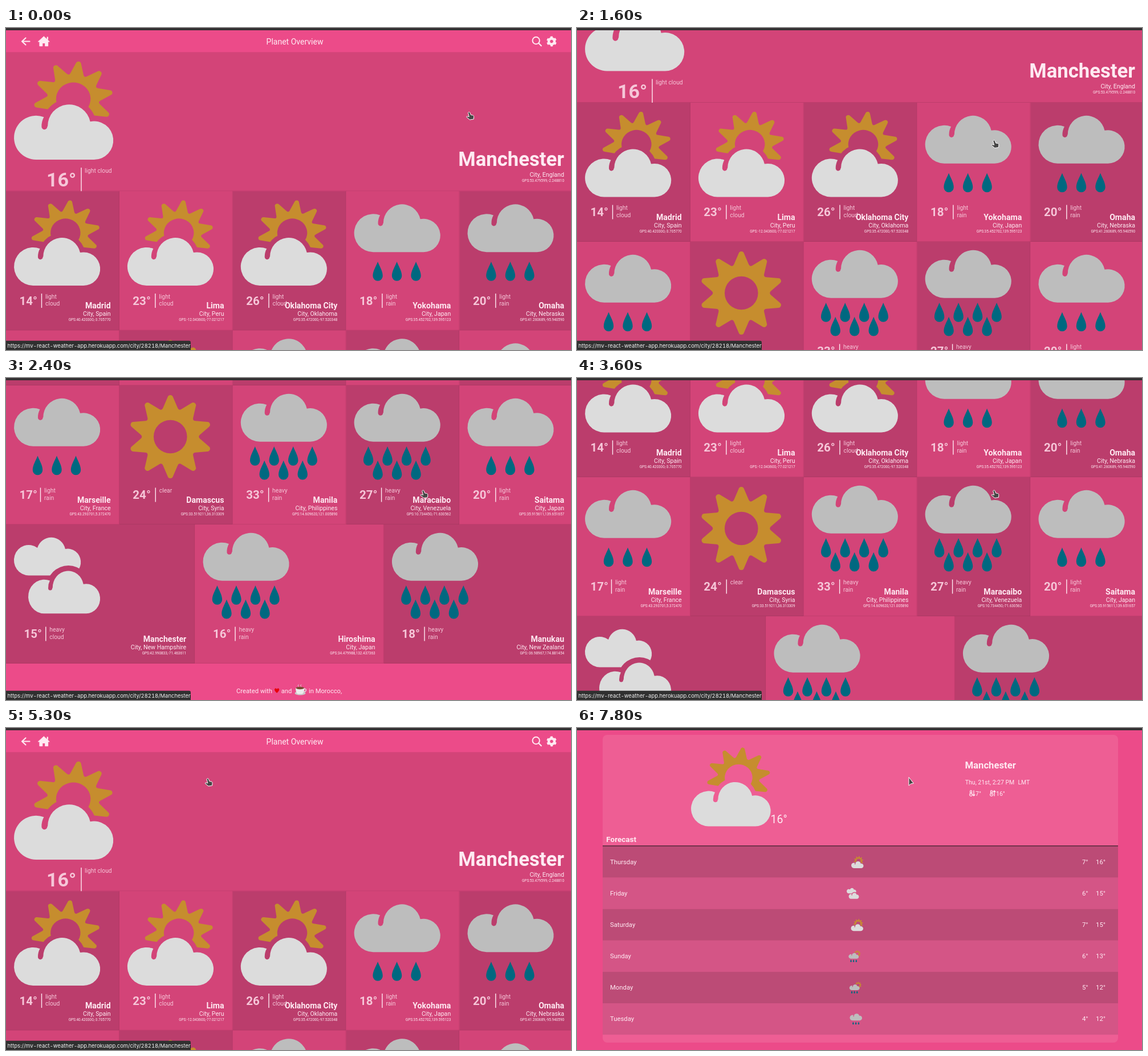
Animation of 991x565 px, one loop 8 s. Source, as an HTML page:

```html
<!DOCTYPE html>
<html lang="en">
<head>
<meta charset="utf-8">
<title>Weather tiles</title>
<style>
html, body { margin: 0; width: 100%; height: 100%; overflow: hidden; background: #ec4b89; }
svg { display: block; width: 991px; height: 565px; }
text { font-family: Roboto, "Open Sans", sans-serif; fill: #ffeaf2; white-space: pre; }
.b { font-weight: 700; }
.soft { fill: #f6c6d8; }
.tip { font-family: Inter, Roboto, sans-serif; font-variant-numeric: tabular-nums; fill: #f2f2f2; }
</style>
</head>
<body>
<svg id="stage" viewBox="0 0 991 565"></svg>
<script>
const LOOP = 8000, PAGE_W = 994.3, ROW_H = 244;
const PINK = '#ec4b89', LIGHT = '#d34478', DARK = '#bb3d6c';
const WHITE = '#ffeaf2', PALE = '#dcdcdc', GREY = '#bdbdbd', SUN = '#c68d2e', RAIN = '#006880';

const text = (x, y, size, str, cls = '', anchor = 'start') =>
  `<text x="${x}" y="${y}" font-size="${size}" class="${cls}" text-anchor="${anchor}">${str}</text>`;
const rect = (x, y, w, h, fill, extra = '') =>
  `<rect x="${x}" y="${y}" width="${w}" height="${h}" fill="${fill}" ${extra}/>`;
const path = (d, fill, extra = '') => `<path d="${d}" fill="${fill}" ${extra}/>`;
const line = (d, width, color = WHITE) =>
  path(d, 'none', `stroke="${color}" stroke-width="${width}" stroke-linecap="round" stroke-linejoin="round"`);
const group = (transform, body) => `<g transform="${transform}">${body}</g>`;

// Weather icons are drawn in a 151-unit square.
const ring = (x, y, r) => `M${x - r} ${y}a${r} ${r} 0 1 0 ${2 * r} 0a${r} ${r} 0 1 0 ${-2 * r} 0Z`;
const outside = (id, x, y, r) =>
  `<clipPath id="${id}"><path clip-rule="evenodd" d="M-40-40H200V200H-40Z${ring(x, y, r)}"/></clipPath>`;

// Ten rounded rays around a hole; valley is the radius where ray sides would meet.
function sun(hole, valley) {
  const tip = [4.7, 69.5], meet = [valley * Math.sin(Math.PI / 10), valley * Math.cos(Math.PI / 10)];
  const bend = tip.map((v, i) => v + (meet[i] - v) * .8);
  let d = '';
  for (let k = 0; k < 10; k++) {
    const spot = ([x, y], side = 1, turn = k) => {
      const a = turn * Math.PI / 5, c = Math.cos(a), s = Math.sin(a);
      return `${(side * x * c + y * s).toFixed(2)} ${(side * x * s - y * c).toFixed(2)}`;
    };
    d += `${k ? 'L' : 'M'}${spot(tip, -1)}A4.9 4.9 0 0 1 ${spot(tip)}` +
      `L${spot(bend)}Q${spot(meet)} ${spot(bend, -1, k + 1)}`;
  }
  return path(d + 'Z' + ring(0, 0, hole), SUN, 'fill-rule="evenodd"');
}

const cloud = fill => path('M33.5 151A33.5 33.5 0 1 1 45.5 86.2Q41.8 93 42 100.7A4.3 4.3 0 0 0 50.6 101' +
  'L51.3 100A32.7 32.7 0 0 1 116 93A29.3 29.3 0 1 1 121.7 151Z', fill);
const plainCloud = path('M33.5 151A33.5 33.5 0 1 1 53 90.3A32.7 32.7 0 0 1 116 93A29.3 29.3 0 1 1 121.7 151Z', PALE);
const drops = (xs, y) => xs.map(x =>
  path(`M${x} ${y}c2.8 8 8.7 16 8.7 25a8.7 8.7 0 0 1-17.4 0c0-9 5.9-17 8.7-25Z`, RAIN)).join('');

const icons = {
  light: `<g clip-path="url(#cutLight)">${group('translate(90.3 58.4) scale(.826 .787) rotate(8)', sun(31.8, 45.5))}</g>` +
    cloud(PALE),
  rain: group('translate(0 -58.7)', cloud(GREY)) + drops([41.5, 75, 108.5], 109),
  pour: group('translate(0 -66.8)', cloud(GREY)) + drops([25, 58.5, 92, 125.5], 92.5) + drops([41.5, 75, 108.5], 117.3),
  clear: group('translate(75.4 75.5)', sun(29.3, 48)),
  heavy: `<g clip-path="url(#cutHeavy)">${group('translate(0 -45.8) scale(.775 .8)', plainCloud)}</g>` +
    group('translate(25 7.4) scale(.834 .89)', cloud(PALE)),
  shower: `<g clip-path="url(#cutShower)">${group('translate(108 43) scale(.58) rotate(8)', sun(31, 45.5))}</g>` +
    group('translate(0 -20) scale(.83)', cloud(GREY)) + drops([30, 62, 95], 113)
};
const defs = `<defs>${outside('cutLight', 84, 100, 41.5)}${outside('cutHeavy', 95.5, 95.5, 38)}` +
  outside('cutShower', 70, 63, 34) +
  Object.entries(icons).map(([id, body]) => `<g id="${id}">${body}</g>`).join('') + '</defs>';
const icon = (id, x, y, size) => `<use href="#${id}" transform="translate(${x} ${y}) scale(${size / 151})"/>`;

// icon, temperature, divider x, condition, name, region, position
const rows = [
  [
    ['light', 14, 62.5, 'light cloud', 'Madrid', 'Spain', '40.420300,-3.705770'],
    ['light', 23, 63, 'light cloud', 'Lima', 'Peru', '-12.043600,-77.021217'],
    ['light', 26, 63.3, 'light cloud', 'Oklahoma City', 'Oklahoma', '35.472000,-97.520348'],
    ['rain', 18, 63.3, 'light rain', 'Yokohama', 'Japan', '35.452702,139.595123'],
    ['rain', 20, 63.4, 'light rain', 'Omaha', 'Nebraska', '41.260689,-95.940590']
  ], [
    ['rain', 17, 60.5, 'light rain', 'Marseille', 'France', '43.293701,5.372470'],
    ['clear', 24, 63.4, 'clear', 'Damascus', 'Syria', '33.519211,36.313309'],
    ['pour', 33, 62.9, 'heavy rain', 'Manila', 'Philippines', '14.609620,121.005890'],
    ['pour', 27, 62, 'heavy rain', 'Maracaibo', 'Venezuela', '10.734450,-71.630562'],
    ['rain', 20, 63.4, 'light rain', 'Saitama', 'Japan', '35.915611,139.651657']
  ], [
    ['heavy', 15, 69.8, 'heavy cloud', 'Manchester', 'New Hampshire', '42.990833,-71.463611'],
    ['pour', 16, 70.6, 'heavy rain', 'Hiroshima', 'Japan', '34.479988,132.437363'],
    ['pour', 18, 71.2, 'heavy rain', 'Manukau', 'New Zealand', '-36.98967,174.881454']
  ]
];

const cell = (x, y, w, fill) => rect(x, y, w, ROW_H + .5, fill) +
  path(`M${x} ${y + ROW_H - .3}H${x + w - .4}V${y}`, 'none', 'stroke="#000" stroke-opacity=".1"');

function tile([kind, temp, divider, sky, name, region, gps], row, col) {
  const w = PAGE_W / rows[row].length, x = col * w, y = 286.5 + row * ROW_H, right = w - 15.2;
  const words = sky.split(' ').map((word, i) => text(divider + 6.5, 188.3 + i * 12.2, 10.3, word, 'soft')).join('');
  return cell(x, y, w, (row + col) % 2 ? LIGHT : DARK) + group(`translate(${x} ${y})`,
    icon(kind, 14, 14.5, 151) +
    text(row === 2 ? 31.5 : 23.5, 199.3, 20.5, temp + '°', 'b soft') +
    rect(divider - .7, 179.5, 1.4, 25, WHITE) + words +
    text(right, 205.5, 14.1, name, 'b', 'end') +
    text(right, 218.7, 10.6, 'City, ' + region, '', 'end') +
    text(right, 227.5, 6.4, 'GPS:' + gps, '', 'end'));
}

const header = rect(0, 0, 991, 42, PINK) +
  line('M41.5 23.5H28.5M34.5 17.5L28 23.5L34.5 29.5', 2.2) +
  path('M56.3 24L66.3 14.8L76.3 24H73.7V31.7H68.7V26.5H63.9V31.7H58.9V24Z', WHITE,
    `stroke="${WHITE}" stroke-width=".9" stroke-linejoin="round"`) +
  path('M71.6 15.5h2.4v5h-2.4Z', WHITE) +
  text(506.5, 28.5, 14, 'Planet Overview', '', 'middle') +
  path(ring(929.7, 22, 6.2), 'none', `stroke="${WHITE}" stroke-width="2"`) + line('M934.4 26.8L938.8 31.2', 2.2) +
  path(ring(957, 23.5, 5), 'none', `stroke="${WHITE}" stroke-width="4.4"`) +
  path(ring(957, 23.5, 7.4), 'none',
    `stroke="${WHITE}" stroke-width="3" stroke-dasharray="4 3.75" stroke-dashoffset="-1.87"`);

const hero = cell(0, 42.3, PAGE_W, LIGHT) + icon('light', 14, 57, 174) +
  text(71, 278, 34, '16°', 'b soft') + rect(131.3, 245, 1.4, 41.5, WHITE) +
  text(138, 254.3, 10.3, 'light cloud', 'soft') +
  text(979, 242.3, 34.7, 'Manchester', 'b', 'end') +
  text(979, 261, 10.7, 'City, England', '', 'end') +
  text(979, 270, 6.4, 'GPS:53.479599,-2.248810', '', 'end');

const cup = '<ellipse cx="516" cy="1070.5" rx="9.5" ry="3.6" fill="#c9c9c9"/>' +
  path('M508 1061.5h15.5c0 6-2.5 10.5-5 10.5h-5.5c-3 0-5-4.5-5-10.5Z', '#ececec') +
  path('M523 1063c5-1 4.5 5.5-1.5 5', 'none', 'stroke="#dedede" stroke-width="1.4"') +
  '<ellipse cx="515.7" cy="1061.5" rx="7.2" ry="2.2" fill="#7a4a32"/>' +
  line('M513 1059q-2-2 0-3.5M517.5 1059q-2-2 0-3.5', 1, '#d8d8d8');
const heart = path('M475.1 1070.3C471 1066.5 470.6 1064.7 471.2 1063.3C472 1061.5 474.3 1061.7 475.1 1063.6' +
  'C475.9 1061.7 478.2 1061.5 479 1063.3C479.6 1064.7 479.2 1066.5 475.1 1070.3Z', '#e8000c');
const footer = rect(0, 1018.5, 991, 70, PINK) + text(404, 1070.3, 11.25, 'Created with') + heart +
  text(482.7, 1070.3, 11.25, 'and') + cup + text(531, 1070.3, 11.2, 'in Morocco,');

// day, icon, icon x, low, high
const days = [
  ['Thursday', 'light', 481, 7, 16], ['Friday', 'heavy', 473, 6, 15], ['Saturday', 'light', 480.5, 7, 15],
  ['Sunday', 'shower', 476.3, 6, 13], ['Monday', 'shower', 477.8, 5, 12], ['Tuesday', 'rain', 478.5, 4, 12]
];
const dayRow = ([day, kind, x, low, high], i) => {
  const y = 207.5 + i * 55.1;
  return rect(45, y, 904, 55.2, i % 2 ? '#d45586' : '#bc4b76') + icon(kind, x, y + 17, 21.5) +
    text(58, y + 31.3, 11.3, day) + text(896.5, y + 31.3, 11.3, low + '°', '', 'end') +
    text(927, y + 31.3, 11.3, high + '°', '', 'end');
};
// Thermometer with an arrow pointing down (1) or up (-1).
const gauge = (x, dir) => path(`M${x + 1.5} 115v-4a1.5 1.5 0 0 1 3 0v4a2.5 2.5 0 1 1-3 0Z`, 'none',
  `stroke="${WHITE}" stroke-width="1.1"`) + line(`M${x + 3} 112v5`, 1.1) +
  line(`M${x + 8} ${114.5 - 4.5 * dir}v${9 * dir}m-1.8 ${-2 * dir}l1.8 ${2 * dir}l1.8 ${-2 * dir}`, 1.3);
const detail = rect(45, 12, 904, 540, '#ee5e94', 'rx="8"') + icon('light', 200, 33, 139.5) +
  text(339.5, 166.8, 19.5, '16°') + text(680.5, 70.5, 16.7, 'Manchester', 'b') +
  text(680.8, 99, 10.5, 'Thu, 21st, 2:27 PM') + text(773.5, 99, 10.3, 'LMT') +
  gauge(688, 1) + text(699, 118.7, 10.5, '7°') + gauge(724, -1) + text(735, 118.7, 10.5, '16°') +
  text(51.3, 199.7, 13.5, 'Forecast', 'b') + days.map(dayRow).join('') + rect(45, 206.3, 904, 1.2, '#2b1a22');

const outline = 'stroke="#fff" stroke-width="1" stroke-linejoin="round"';
const hand = path('M4.5 1.2C5.6.6 6.5 1.2 6.9 2.2L8.4 6L11.5 6.5C13 6.8 13.6 7.8 13.5 9.2L13.2 13.5' +
  'L6.5 14.5L1.2 10.2C.3 9.3 1.2 8 2.5 8.5L5.3 9.3L3.6 3C3.4 2.2 3.8 1.5 4.5 1.2Z', '#464646', outline);
const arrow = path('M0 0V14.8L3.4 11.7L8.3 10.8Z', '#464646', outline);

const stage = document.getElementById('stage');
const tiles = rows.map((cells, row) => cells.map((data, col) => tile(data, row, col)).join('')).join('');
stage.innerHTML = defs + rect(0, 0, 991, 565, PINK) +
  `<g id="page">${header}<g id="tiles">${hero}${tiles}${footer}</g></g>` +
  `<g id="detail">${detail}</g>` + rect(0, 0, 991, 4, '#353033') +
  `<g id="tip"><path id="tipBox" fill="#303030"/>${text(2.5, 560.7, 9.45, '', 'tip')}</g>` +
  `<g id="hand">${hand}</g><g id="arrow">${arrow}</g>`;

const el = id => document.getElementById(id);
const tipText = el('tip').querySelector('text');
const show = (id, on) => el(id).setAttribute('display', on ? 'inline' : 'none');
const move = (id, x, y) => el(id).setAttribute('transform', `translate(${x} ${y})`);

// Stepped tracks: the latest entry at or before t holds.
const scrollTrack = [[0, 0], [1100, 8], [1200, 30], [1300, 62], [1400, 95], [1500, 126], [1600, 155.5],
  [1700, 210], [1800, 255], [2200, 330], [2300, 440], [2400, 517.5], [3400, 495], [3500, 430], [3600, 356.5],
  [3700, 300], [3800, 270], [4100, 220], [4200, 115], [4300, 25], [4400, 10], [4600, 4], [4800, 0]];
const pointer = [[0, 807, 146.5], [100, 788.5, 172], [300, 775, 178], [400, 755, 187], [500, 736, 194],
  [600, 726.3, 196], [5300, 348.5, 87.5], [5500, 251.5, 55.5], [5700, 225, 48], [5800, 190, 47], [5900, 155, 62],
  [6000, 137.5, 81.5], [6300, 137.5, 82.7], [7100, 380, 83], [7200, 580.5, 86], [7400, 582, 86.3]];
const hold = (track, t) => track.filter(k => k[0] <= t).pop();

function draw(t) {
  const scroll = hold(scrollTrack, t)[1], [, x, y] = hold(pointer, t);
  move('page', 0, -scroll);
  show('page', t < 7800);
  show('tiles', t < 6800);
  show('detail', t >= 7800);
  const far = t >= 4100 && t < 5300, edge = far ? 326.5 : 324;
  show('tip', t < 7100);
  el('tipBox').setAttribute('d', `M0 548.8H${edge - 3}q3 0 3 3V565H0Z`);
  tipText.textContent = 'https://mv-react-weather-app.herokuapp.com/city/' + (far ? '1118550/Yokohama' : '28218/Manchester');
  const pointing = t < 7100;
  show('hand', pointing);
  show('arrow', !pointing);
  move(pointing ? 'hand' : 'arrow', x, y);
}

const start = performance.now();
function tick() {
  draw((performance.now() - start) % LOOP);
  requestAnimationFrame(tick);
}
tick();
</script>
</body>
</html>
```
